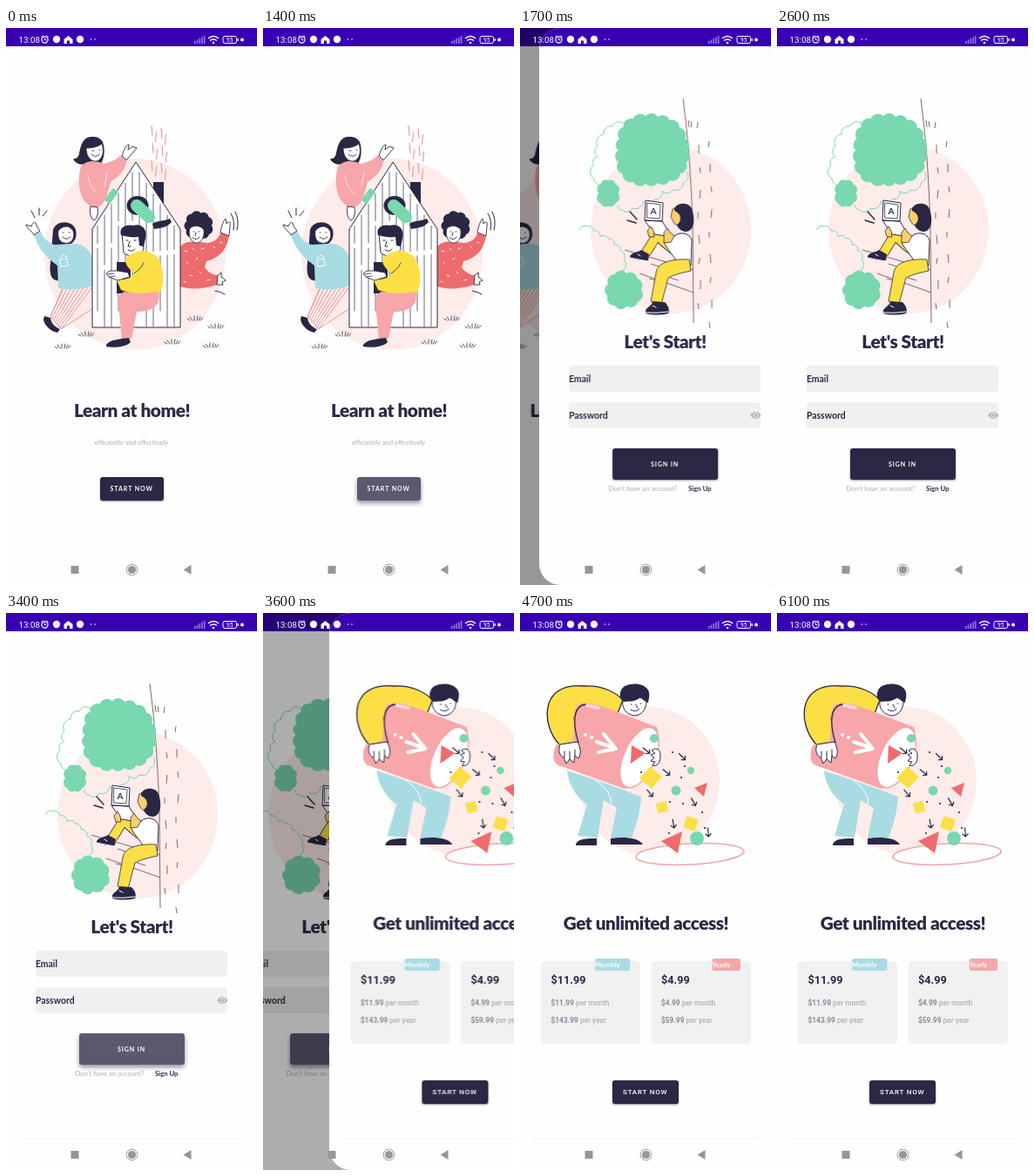
Write an HTML page that moves like this. It is 288x640 px and loops after 6200 ms.

```html
<!DOCTYPE html>
<html lang="en">
<head>
<meta charset="utf-8">
<title>Learn at home</title>
<style>
html, body { margin: 0; width: 100%; height: 100%; overflow: hidden; background: #000; }
#stage { position: absolute; inset: 0; width: 288px; height: 640px; overflow: hidden; }
.screen {
  position: absolute; inset: 0; overflow: hidden; will-change: transform;
  background: linear-gradient(#f3f4f3, #f3f4f3) 14px 604px / 260px 1px no-repeat #fdfefd;
}
.screen::before { content: ""; position: absolute; inset: 0 0 auto; height: 21.4px; background: #3900b3; }
.screen::after { content: ""; position: absolute; inset: 0; background: #000; opacity: var(--dim, 0); }
svg { position: absolute; inset: 0; width: 288px; height: 640px; }
.button {
  --press: 0;
  position: absolute; box-sizing: border-box; border-radius: 3px;
  background: color-mix(in srgb, #fff calc(var(--press) * 23%), #2a2845);
  box-shadow: 0 calc(1px + 2px * var(--press)) calc(2px + 3px * var(--press)) #2a284580;
  color: #fff; text-align: center; white-space: nowrap;
  font: 700 7px Lato, sans-serif; letter-spacing: .95px;
}
.button.roboto { font: 500 8px Roboto, sans-serif; letter-spacing: .8px; }
.screen text { fill: #2a2947; font-family: Lato, sans-serif; }
.title { font-size: 20.8px; font-weight: 900; letter-spacing: -.45px; text-anchor: middle; }
.label { font-size: 10.4px; font-weight: 700; }
.small { font-size: 7.7px; }
.screen .faint { fill: #adacbc; }
.screen .price, .screen .rate { font-family: Roboto, sans-serif; font-weight: 700; }
.price { font-size: 12.7px; }
.screen .rate { font-size: 8.4px; fill: #8b8a9e; }
.rate tspan { fill: #b0afbd; font-weight: 500; }
.screen .tag { fill: #fff; font-size: 7.6px; font-weight: 700; }
.navy { fill: #292743; }
.skin { fill: #fff; stroke: #292743; stroke-linejoin: round; }
.tan { fill: #fbd06a; }
.line { fill: none; stroke: #292743; stroke-linecap: round; stroke-linejoin: round; }
.white { fill: none; stroke: #fff; stroke-linecap: round; stroke-linejoin: round; }
.blush { fill: #fdecea; }
.pink { fill: #f7a6aa; }
.coral { fill: #ee6b6d; }
.yellow { fill: #fbdf45; }
.teal { fill: #a9dbe3; }
.green { fill: #79d8b0; }
.fringe { fill: none; stroke: #79d8b0; }
.bark { fill: none; stroke: #8a6468; }
</style>
</head>
<body>
<div id="stage">
  <div class="screen">
    <svg viewBox="0 0 288 640">
      <defs>
        <path id="grass" class="line" stroke-width=".8" d="M-9 0l3 2M-6-2l3 4M-1-3l0 5M3-3l-1 5M6-2l-2 4M9-1l-3 3"/>
      </defs>
      <ellipse class="blush" cx="148" cy="260" rx="104" ry="110"/>
      <g id="grasses"></g>
      <path id="smoke" fill="none" stroke="#ef8b8d"/>

      <!-- left friend -->
      <path class="navy" d="M54 232C57 221 76 220 80 232C83 244 74 251 66 251L62 290C53 292 49 284 51 270Z"/>
      <path class="skin" stroke-width=".8" d="M60 233C66 226 73 227 77 233C80 242 74 249 67 247C61 246 59 240 60 233Z"/>
      <path class="line" stroke-width=".9" d="M65 235h1M72 235h1M65 240q4 5 9 0"/>
      <path id="stripes" fill="none" stroke="#f08388" stroke-width=".9"/>
      <path class="navy" d="M44 331L51 333C52 340 57 344 62 346L59 350C52 349 44 342 43 335Z"/>
      <path class="teal" d="M32 237L39 233C44 242 48 248 57 249L72 248C88 246 97 254 101 270L103 295C90 300 74 302 60 299L59 273C46 264 36 252 32 237Z"/>
      <path class="skin" stroke-width=".9" d="M32 238C31 234 25 232 23 226L29 228C30 225 32 222 34 224L36 229L39 233Z"/>
      <path class="white" d="M62 266l8-1 1 8-8 1zM62 264l4-3 4 2"/>
      <path class="line" d="M29 210l4 8M38 207l0 8M47 210l-5 6"/>

      <!-- right friend -->
      <path class="coral" d="M200 251C208 243 220 246 231 247C240 246 244 242 247 234L256 239C253 255 245 264 230 268L228 275C232 281 238 284 243 284L242 295C227 300 211 301 200 297Z"/>
      <path class="white" d="M205 256l3 1M214 253l2 2M224 254l3-1M238 251l2 2M246 246l2 1M207 269l2 2M218 266l2-2M211 284l3 1M222 280l2 2M231 290l3-1M204 291l2 1"/>
      <path id="curls" class="navy"/>
      <path class="skin" stroke-width=".8" d="M211 230C216 226 224 227 227 232C228 242 223 248 217 247C211 245 209 236 211 230Z"/>
      <path class="line" stroke-width=".9" d="M215 234h1M221 234h1M218 235l-1 4M214 241q5 4 8-1"/>
      <path class="skin" stroke-width=".9" d="M246 235C247 229 249 222 252 219L253 225C256 222 258 222 257 227L256 239Z"/>
      <path class="skin" stroke-width=".9" d="M243 284L247 281L247 286L252 290L248 292L249 295L242 295Z"/>
      <path class="line" d="M258 213q5 8 3 19M263 211q5 10 2 21M240 302q7 1 11 4"/>

      <!-- house -->
      <path class="navy" d="M169 177h12v45h-12z"/>
      <path class="skin" d="M149 154L200 231V344H99V231Z"/>
      <path id="planks" class="line" stroke-width=".7"/>
      <ellipse class="navy" cx="151" cy="204" rx="12.5" ry="11"/>
      <path d="M150 204L164 217" stroke="#79d8b0" stroke-width="14" stroke-linecap="round"/>
      <path class="navy" d="M168 225C173 221 181 222 188 219L190 223C185 229 177 230 170 231Z"/>

      <!-- friend on the roof -->
      <path d="M126 186L116 200" stroke="#79d8b0" stroke-width="8"/>
      <path class="navy" d="M100 125C88 124 86 135 84 144C83 149 80 151 77 150C79 156 86 158 92 156L108 157C113 151 114 139 111 131C108 126 104 125 100 125Z"/>
      <path class="pink" d="M86 159C82 172 83 190 91 200L99 207C109 207 113 200 116 192L120 177C130 171 138 161 138 153L132 146C127 151 121 154 112 156C103 151 92 152 86 159Z"/>
      <path class="skin" stroke-width=".8" d="M92 138C98 138 105 137 110 133C113 142 111 151 104 153C97 154 92 147 92 138Z"/>
      <path class="line" stroke-width=".9" d="M99 141h2M107 140h1M98 145q5 5 9 0"/>
      <path class="skin" stroke-width=".9" d="M133 147C135 141 137 135 141 134L140 140L145 136L150 138L144 145L138 152Z"/>
      <path class="skin" stroke-width=".9" d="M97 205C95 212 98 220 101 221C105 219 106 212 105 206Z"/>
      <path class="white" stroke-width=".7" d="M94 169q1 13 10 21M116 165l-3 17"/>

      <!-- friend in front -->
      <path class="navy" d="M127 269h16v36h-16z"/>
      <path class="skin" d="M133 236C139 232 155 232 157 239L158 254C153 264 141 264 135 258Z"/>
      <path class="navy" d="M132 238C129 229 138 225 146 227C155 224 163 231 160 242L158 251L153 250L152 240C146 241 139 240 132 238Z"/>
      <path class="line" d="M138 244h2M147 244h2M142 245l-2 6h3M140 255q5 3 8-1"/>
      <path class="yellow" d="M138 264C149 253 167 254 175 265C182 278 182 296 176 305C160 309 145 306 132 301L126 288C136 290 144 288 147 282C141 276 135 271 138 264Z"/>
      <path class="skin" stroke-width=".9" d="M128 290L118 286L115 282L119 279L128 279L140 281L142 286Z"/>
      <path class="line" stroke-width=".8" d="M147 282q8-5 11-12M117 283l7-1M119 286l6-1"/>
      <path class="pink" d="M136 303C149 306 164 305 175 303C179 319 167 326 150 326L144 357L133 357L129 318C128 310 130 305 136 303Z"/>
      <path class="navy" d="M115 364C119 358 132 357 141 356L143 361C139 366 124 368 115 366Z"/>

      <text class="title" x="144.5" y="447">Learn at home!</text>
      <text class="small faint" x="144" y="479" text-anchor="middle">efficiently and effectively</text>
    </svg>
    <div class="button" style="left:108px;top:516px;width:72.5px;height:27px;line-height:27px">START NOW</div>
  </div>

  <div class="screen">
    <svg viewBox="0 0 288 640">
      <ellipse class="blush" cx="151" cy="232" rx="92" ry="96"/>
      <path class="bark" d="M165 81Q174 150 176 230L177 339M177 278L98 255M177 304L115 282M128 271l12 4M150 287l10 3M126 288l8 2"/>
      <path id="barkMarks" class="bark"/>
      <path id="fringes" class="fringe"/>
      <path id="leaves" class="green"/>

      <!-- reader -->
      <path d="M167 262C153 256 146 248 135 238L122 259" fill="none" stroke="#292743" stroke-width="11.6" stroke-linejoin="round"/>
      <path d="M167 262C153 256 146 248 135 238L122 259" fill="none" stroke="#fbdf45" stroke-width="10" stroke-linejoin="round"/>
      <path class="skin" d="M155 239C162 233 173 236 175 244L174 273L158 268C153 261 146 253 143 246L151 242Z"/>
      <path class="yellow" stroke="#292743" stroke-width=".8" d="M172 266C155 265 136 268 134 281L128 314L140 317L148 287C155 283 165 281 174 279Z"/>
      <path class="navy" d="M104 262C107 257 113 258 117 255L126 260L125 267C118 268 110 266 104 264ZM122 324C126 319 129 319 130 314L144 315C148 319 150 324 148 328C139 330 129 330 122 328Z"/>
      <path class="white" d="M104 264l20 4M122 327q13 1 26-1M113 260l3 2M130 319l4 2"/>
      <path class="skin tan" stroke-width=".8" d="M153 208C160 204 167 209 166 221C166 229 157 229 154 223L151 217Z"/>
      <path class="navy" d="M155 207C159 200 172 200 175 208C178 216 179 229 172 233C166 236 159 231 158 226C164 222 163 213 155 210Z"/>
      <path class="skin" d="M122 198L142 201L141 222L121 221ZM121 221L141 222L152 240L132 237Z"/>
      <path class="line" stroke-width=".8" d="M124 201l15 2-1 16-14-1z"/>
      <text x="131" y="214" text-anchor="middle" font-size="10" font-weight="700">A</text>
      <path class="skin tan" stroke-width=".8" d="M143 247L143 235L147 230L150 235L155 239L151 246ZM126 240L124 233L128 228L131 233L132 240Z"/>
      <path class="line" stroke-width="1.4" d="M104 211l8 9M101 221l10 3"/>

      <text class="title" x="144.5" y="368">Let's Start!</text>
      <rect x="34" y="388" width="220" height="30" rx="4" fill="#f0f0f0"/>
      <rect x="34" y="430" width="220" height="30" rx="4" fill="#f0f0f0"/>
      <text class="label" x="34" y="406.5">Email</text>
      <text class="label" x="34" y="448.5">Password</text>
      <path d="M242 445Q248 437 254.500 445Q248 453 242 445Z" fill="#b7b7ba"/>
      <circle cx="248.300" cy="445" r="2.400" fill="#b7b7ba" stroke="#f0f0f0"/>
      <text class="small faint" x="79.500" y="532">Don't have an account?</text>
      <text class="small" x="171" y="532" font-weight="700">Sign Up</text>
    </svg>
    <div class="button" style="left:83.5px;top:482.5px;width:121px;height:36px;line-height:36px">SIGN IN</div>
  </div>

  <div class="screen">
    <svg viewBox="0 0 288 640">
      <ellipse class="blush" cx="148" cy="193" rx="81" ry="85"/>
      <ellipse cx="195" cy="277" rx="62" ry="12" transform="rotate(-3 195 277)" fill="#fdfefd" stroke="#f3a3a9" stroke-width="1.6"/>

      <!-- carrier -->
      <path class="teal" d="M54 181L104 198L139 211C138 229 133 245 128 258L104 258L111 224L96 215L89 258L66 256L77 220C64 211 55 196 54 181Z"/>
      <path class="white" d="M88 193Q104 203 105 219"/>
      <path class="navy" d="M64 266C66 260 72 259 88 259V267H64ZM104 259C119 257 136 258 141 266H104Z"/>
      <path class="yellow" d="M46 152C34 140 28 120 33 104C39 87 54 82 75 84C94 83 110 91 118 100L111 118L75 112L62 120L66 150Z" stroke="#292743" stroke-width="1.3"/>
      <path class="skin" d="M119 97C124 91 139 92 145 98C146 109 141 117 132 118C122 117 115 109 119 97Z"/>
      <path class="navy" d="M116 89C118 81 138 78 146 87C150 92 148 98 147 103C142 102 140 97 137 98C130 103 124 101 119 102C114 99 114 93 116 89Z"/>
      <path class="line" d="M127 105h1M138 104h1M133 105l2 4M127 111q6 4 10-1"/>
      <path class="pink" d="M67 105C76 101 91 106 110 113L157 131C165 150 148 197 120 202L84 189L44 175C37 172 37 159 42 151L61 147C63 130 59 113 67 105Z"/>
      <path d="M77 106l13 3" stroke="#fbd3d6" stroke-width="4" stroke-linecap="round"/>
      <ellipse cx="137" cy="166" rx="18" ry="37" transform="rotate(24 137 166)" fill="#fff" stroke="#f6a4ab" stroke-width="1.500"/>
      <path class="white" stroke-width="4" d="M88 148L108 155M96 139L110 156L90 160M75 140h.1M82 143h.1"/>
      <path class="line" stroke-width="1.3" d="M75 105C61 107 60 126 67 149"/>
      <path class="skin" d="M46 151L66 148C69 154 71 161 67 167L63 164L62 172L57 168L53 173L50 166C44 163 44 156 46 151Z"/>
      <path class="line" d="M57 159v9M63 157v7M51 159v7"/>

      <path class="coral" d="M128 152L144 161L127 173ZM200 201L215 195L211 211ZM162 262L186 251L181 276Z"/>
      <g id="squares" class="yellow"></g>
      <g id="dots" class="green"></g>
      <path class="skin" d="M151 158C157 153 162 158 161 166C161 172 157 177 152 175L155 171L150 170L154 166L150 163L155 161Z"/>
      <g id="arrows"></g>
      <path id="specks" class="line" stroke-width="2"/>

      <text class="title" x="144.500" y="363.500">Get unlimited access!</text>
      <g id="plans"></g>
    </svg>
    <div class="button roboto" style="left:105.5px;top:536.5px;width:76.5px;height:27px;line-height:27px">START NOW</div>
  </div>

  <svg viewBox="0 0 288 640" id="system">
    <g fill="#fff">
      <text x="14.500" y="17" font-family="Roboto, sans-serif" font-size="9.8">13:08</text>
      <circle cx="44.500" cy="13.500" r="3.600" fill="none" stroke="#fff" stroke-width="1.200"/>
      <path d="M44.500 11.500v2.300h2M40.500 10.500l2-2M48.500 10.500l-2-2" fill="none" stroke="#fff"/>
      <circle cx="58" cy="13" r="4.200"/>
      <path d="M66.500 13L71.500 9L76.500 13V18H73V14.500H70V18H66.500Z"/>
      <circle cx="85" cy="13" r="4.200"/>
      <circle cx="97.500" cy="13" r=".8"/><circle cx="102" cy="13" r=".8"/>
      <path opacity=".45" d="M216 15h1.700v3h-1.700zM218.700 13.500h1.700V18h-1.700zM221.400 12h1.700v6h-1.700zM224.100 10.500h1.700V18h-1.700zM226.800 9h1.700v9h-1.700z"/>
      <path d="M232 12q6-5 12 0M234 14.500q4-3 8 0" fill="none" stroke="#fff" stroke-width="1.500"/>
      <circle cx="238" cy="17" r="1.300"/>
      <rect x="249" y="9.500" width="15.500" height="8" rx="2" fill="none" stroke="#fff"/>
      <path d="M265.500 12h1.300v3h-1.300z"/>
      <text x="256.700" y="16" font-family="Roboto, sans-serif" font-size="6.500" text-anchor="middle">95</text>
      <circle cx="271" cy="13.500" r="1.900"/>
    </g>
    <g fill="#969696">
      <path d="M74.500 618h9v9h-9zM203.500 622.500L212.500 617V628Z"/>
      <circle cx="144.500" cy="622.500" r="4.600"/>
      <circle cx="144.500" cy="622.500" r="6.300" fill="none" stroke="#969696"/>
    </g>
  </svg>
</div>

<script>
const $ = id => document.getElementById(id);
const setPath = (id, d) => $(id).setAttribute("d", d);
const range = n => [...Array(n).keys()];

// Scalloped edge through a list of points.
const scallop = pts => pts.map(([x, y], i) => {
  if (!i) return `M${x} ${y}`;
  const r = Math.hypot(x - pts[i - 1][0], y - pts[i - 1][1]) * .6;
  return `A${r} ${r} 0 0 1 ${x} ${y}`;
}).join("");

// Slightly squared, uneven ellipse with a scalloped edge.
const cloud = (cx, cy, rx, ry, n) => scallop(range(n + 1).map(i => {
  const a = i % n / n * 2 * Math.PI;
  const k = 1 - .04 * Math.cos(4 * a) + .03 * Math.sin(3 * a + 1);
  return [cx + rx * k * Math.cos(a), cy + ry * k * Math.sin(a)];
})) + "Z";

$("grasses").innerHTML = [[92, 352], [65, 366], [191, 361], [217, 334], [241, 343], [235, 365]]
  .map(([x, y]) => `<use href="#grass" x="${x}" y="${y}"/>`).join("");

setPath("smoke", range(4).map(i =>
  range(3).map(j => `M${167 + i * 5.5 + (j % 2)} ${112 + j * 20 + (i * 7) % 11}l${i % 2 ? -1 : 1} 12`).join("")).join(""));

setPath("stripes", range(8).map(i =>
  `M${65 + i * 4.8} ${300 - i * .3}L${51 + i * 1.8} ${332 + i * 2}`).join("") + "M100 322L63 346M65 300L51 332L64 346");

setPath("curls", cloud(221, 227, 15, 15, 9));

setPath("planks", range(12).map(i => {
  const x = 105 + i * 8;
  const top = 160 + Math.abs(x - 149) * 1.53;
  const gap = top + 20 + (i * 37) % 50;
  return `M${x} ${top}V${gap}M${x} ${gap + 6}V${i % 3 ? 343 : 325}`;
}).join(""));

setPath("barkMarks", range(18).map(i => {
  const row = Math.floor(i / 2);
  const x = (i % 2 ? 195 : 182) + (row * 5) % 4;
  return `M${x} ${108 + row * 26 + (i % 2) * 22 % 26}l${row % 3 - 1} ${7 + row % 2 * 3}`;
}).join("") + "M171 106l1 8M174 107l1 7");

setPath("leaves", cloud(129, 140.5, 41, 40, 18) + cloud(79, 190, 11.5, 15, 8) + cloud(97, 301, 20, 20, 9));

setPath("fringes", [
  [[75, 180], [63, 173], [62, 158], [67, 148], [67, 136], [74, 122], [84, 113], [97, 110]],
  [[169, 165], [165, 178], [153, 186], [141, 187], [132, 197], [119, 199], [107, 207], [95, 209], [90, 203]],
  [[46, 232], [54, 228], [62, 233], [70, 240], [79, 242], [86, 249], [93, 256], [97, 266], [95, 279]]
].map(scallop).join(""));

$("squares").innerHTML = [[150, 189, 18, 42], [163, 223, 12, -15], [196, 242, 14, 18]].map(([x, y, s, a]) =>
  `<rect x="${x - s / 2}" y="${y - s / 2}" width="${s}" height="${s}" transform="rotate(${a} ${x} ${y})"/>`).join("");

$("dots").innerHTML = [[154, 144, 5], [196, 181, 4.2], [179, 204, 5.5], [203, 259, 8]]
  .map(([x, y, r]) => `<circle cx="${x}" cy="${y}" r="${r}"/>`).join("");

$("arrows").innerHTML = [[186, 165, 45], [168, 183, 40], [149, 207, 50], [199, 217, 60], [176, 242, 80], [216, 252, 85], [145, 158, 40]]
  .map(([x, y, a]) => `<path class="line" stroke-width="1.2" transform="translate(${x} ${y}) rotate(${a})" d="M-5 0H5M2-3L5 0L2 3"/>`).join("");

setPath("specks", [[175, 160], [189, 176], [172, 217], [187, 219], [209, 229], [171, 253], [212, 247], [139, 183], [185, 189]]
  .map(([x, y]) => `M${x} ${y}h.1`).join(""));

const plan = (x, width, price, year, tag, tagX, tagWidth, color) => `
  <rect x="${x}" y="400" width="${width}" height="95" rx="5" fill="#f1f1f1"/>
  <rect class="${color}" x="${tagX}" y="397" width="${tagWidth}" height="14" rx="3"/>
  <text class="tag" x="${tagX}" y="406.500">${tag}</text>
  <text class="price" x="${x + 11.5}" y="425.500">${price}</text>
  <text class="rate" x="${x + 11.5}" y="451">${price}<tspan> per month</tspan></text>
  <text class="rate" x="${x + 11.5}" y="471">${year}<tspan> per year</tspan></text>`;
$("plans").innerHTML =
  plan(24, 114, "$11.99", "$143.99", "Monthly", 86, 40.5, "teal") +
  plan(150.5, 114.5, "$4.99", "$59.99", "Yearly", 220.5, 32.5, "pink");

const LOOP = 6200, WIDTH = 288, SETTLE = 560;
const starts = [-Infinity, 1470, 3458, Infinity];
const screens = [...document.querySelectorAll(".screen")];
const buttons = [...document.querySelectorAll(".button")];

// Critically damped spring: 1 = off to the right, 0 = in place.
function offset(t, start) {
  if (t <= start) return 1;
  if (t > start + SETTLE) return 0;
  const w = (t - start) * .01826;
  return (1 + w) * Math.exp(-w);
}

function draw() {
  const t = performance.now() % LOOP;
  screens.forEach((screen, i) => {
    const own = offset(t, starts[i]);
    const covered = 1 - offset(t, starts[i + 1]);
    const moving = own > 0 && own < 1;
    screen.style.transform = `translateX(${WIDTH * own - WIDTH / 4 * covered}px)`;
    screen.style.borderRadius = moving ? "24px" : "0";
    screen.style.setProperty("--dim", .44 * covered);
    const press = (t - starts[i + 1] + 230) / 150;
    buttons[i].style.setProperty("--press", Math.max(0, Math.min(1, press)));
  });
  requestAnimationFrame(draw);
}
draw();
</script>
</body>
</html>
```
